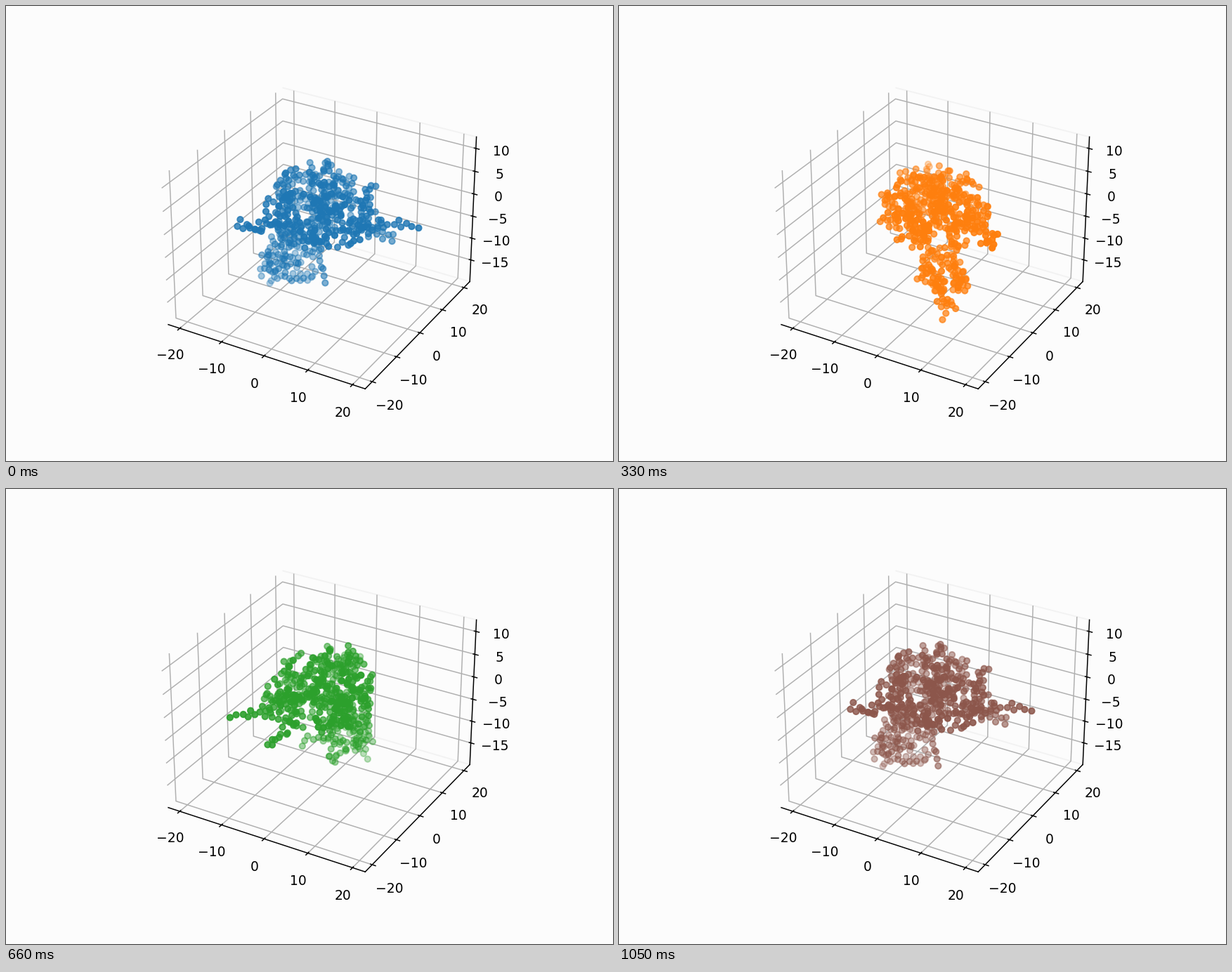
Animation, 864 px wide and 648 px high, one loop 1.08 s. Source, as a matplotlib script:

```python
import numpy as np
import matplotlib.pyplot as plt
from matplotlib.animation import ArtistAnimation

FRAMES = 36
INTERVAL = 30
COUNT = 500
STEP = 1.42
BACKGROUND = "#fcfcfc"

# Axes: across the first view, away from the viewer, height
BODY = np.array([(0, 0, 2), (12.3, 12.3, 8.2)])      # centre, radii
LOBE = np.array([(-7, 1, -10.5), (7, 6, 6.5)])
ARMS = np.array([
    (19.1, -6.5, 0.6), (-18.4, -5, 0), (14.6, -0.9, -5.2), (-14, -7, 1),
    (9.6, -11.3, -0.6), (0.5, -5.9, -15), (-12.4, 3.1, -18.1),
])


def in_ellipsoid(rng, shape):
    way = rng.normal(size=3)
    reach = rng.random() ** (1 / 3)
    return shape[0] + shape[1] * reach * way / np.linalg.norm(way)


def pick_goal(rng):
    kind = rng.random()
    if kind < 0.68:
        return in_ellipsoid(rng, BODY)
    if kind < 0.87:
        return in_ellipsoid(rng, LOBE)
    arm = ARMS[rng.integers(len(ARMS))]
    return arm * rng.uniform(0.6, 1) + rng.normal(0, 0.7, 3)


def grow_cluster(seed=4):
    """Let the nearest particle bud one step towards each random goal."""
    rng = np.random.default_rng(seed)
    points = np.zeros((1, 3))
    while len(points) < COUNT:
        goal = pick_goal(rng)
        gaps = np.linalg.norm(points - goal, axis=1)
        near = gaps.argmin()
        if gaps[near] < 1:
            continue
        bud = points[near] + STEP * (goal - points[near]) / gaps[near]
        if np.linalg.norm(points - bud, axis=1).min() > 1.1:
            points = np.vstack([points, bud])
    return points


def make_axes(fig):
    ax = fig.add_subplot(projection="3d")
    ax.set_facecolor(BACKGROUND)
    for axis in (ax.xaxis, ax.yaxis, ax.zaxis):
        axis.pane.fill = False
        axis.pane.set_edgecolor("none")
    ax.yaxis.pane.set_edgecolor("#e9e9e9")
    return ax


def set_scales(ax):
    ax.set(xlim=(-22.8, 22.8), ylim=(-22.8, 22.8), zlim=(-20.05, 12.5),
           xticks=range(-20, 21, 10), yticks=range(-20, 21, 10),
           zticks=range(-15, 11, 5))


fig = plt.figure(figsize=(6.4, 4.8), dpi=135, facecolor=BACKGROUND)
ax = make_axes(fig)

across, away, height = grow_cluster().T
flat = (across + 1j * away) * np.exp(1j * np.pi / 6)

# One full turn, with a new cycle colour at every step
shots = []
for i in range(FRAMES):
    turned = flat * np.exp(2j * np.pi * i / (FRAMES - 1))
    shots.append([ax.scatter(turned.real, turned.imag, height, color=f"C{i % 10}")])
set_scales(ax)

anim = ArtistAnimation(fig, shots, interval=INTERVAL, repeat=True, repeat_delay=0)
plt.show()
```
